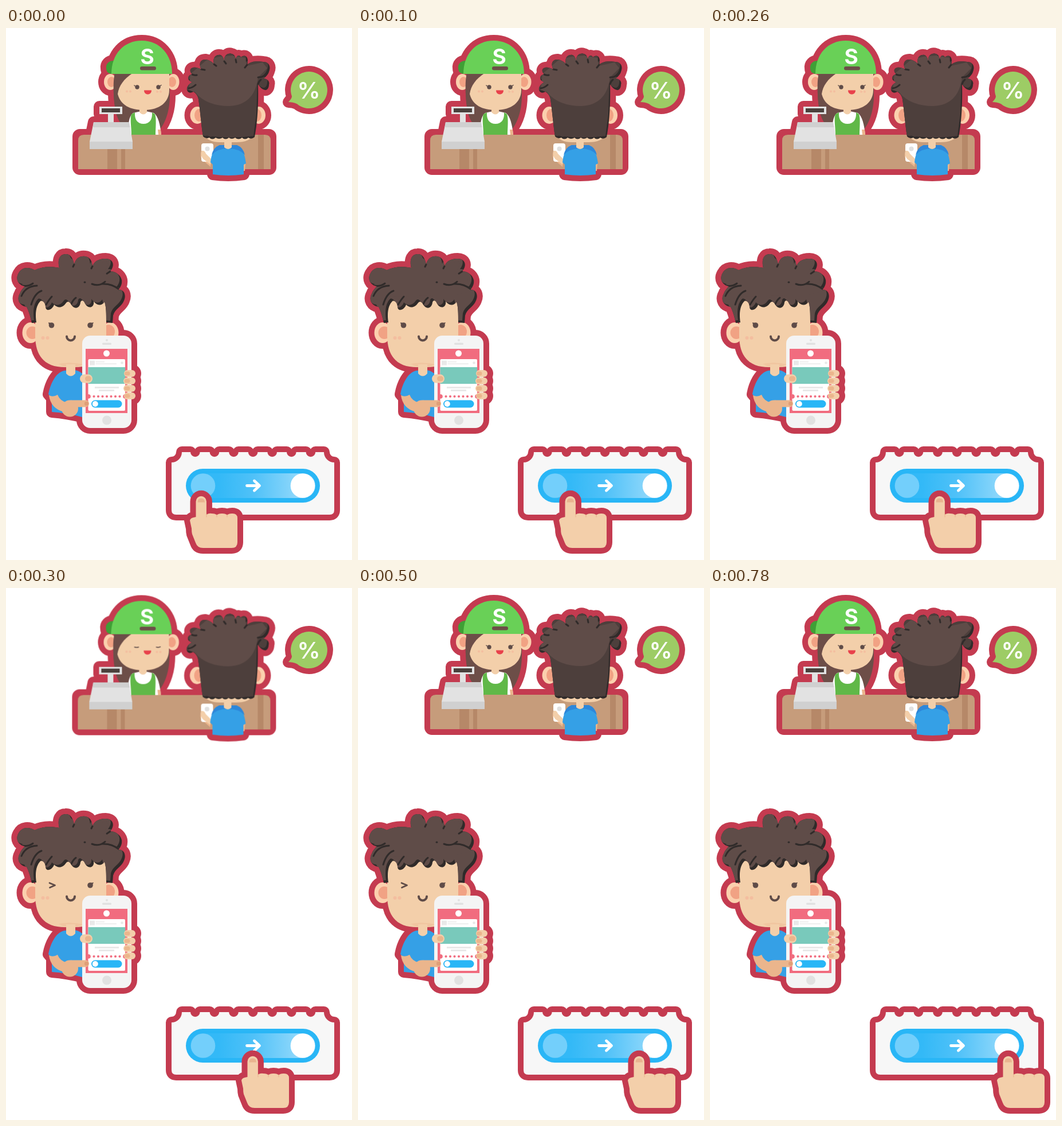
These frames come from a looping animation (604 by 927 pixels, 900 ms). An HTML page:

```html
<!DOCTYPE html>
<html lang="en">
<head>
<meta charset="utf-8">
<title>Slide the coupon</title>
<style>
  html, body { margin: 0; width: 100%; height: 100%; overflow: hidden; background: #fff; }
  svg { display: block; width: 604px; height: 927px; }
  text { font-family: Inter, "Liberation Sans", sans-serif; fill: #fff; text-anchor: middle; }
  .rim { fill: #c43b50; stroke: #c43b50; stroke-width: 20; stroke-linejoin: round; }
  .skin { fill: #f3cfaa; }
  .ear { fill: #fbd0ae; }
  .blush { fill: #f1a284; }
  .tan { fill: #ebb58c; }
  .shirt { fill: #35a0e6; }
  .dark { fill: #302b2a; }
  .hair { fill: #5f4c48; }
  .brown { fill: #6d4e48; }
  .ink { fill: none; stroke: #5f4c48; stroke-linecap: round; stroke-linejoin: round; }
  .curl { fill: none; stroke: #302b2a; stroke-width: 3; stroke-linecap: round; }

  /* One 900 ms loop; every pose is held, then jumps. */
  #hand { animation: drag 900ms infinite; }
  #shop { animation: nudge 900ms step-end infinite; }
  .blinkOpen { animation: hide 900ms step-end infinite; }
  .blinkShut { animation: show 900ms step-end infinite; }
  .winkOpen { animation: hideLong 900ms step-end infinite; }
  .winkShut { animation: showLong 900ms step-end infinite; }
  @keyframes drag {
    0% { transform: translateX(0); animation-timing-function: steps(6, end); }
    66.66%, 100% { transform: translateX(180px); }
  }
  @keyframes nudge { 0%, 55.55% { transform: none; } 33.33% { transform: translate(-.6px, .5px); } }
  @keyframes hide { 0%, 55.55% { opacity: 1; } 33.33% { opacity: 0; } }
  @keyframes show { 0%, 55.55% { opacity: 0; } 33.33% { opacity: 1; } }
  @keyframes hideLong { 0%, 66.66% { opacity: 1; } 33.33% { opacity: 0; } }
  @keyframes showLong { 0%, 66.66% { opacity: 0; } 33.33% { opacity: 1; } }
</style>
</head>
<body>
<svg viewBox="0 0 604 927" xmlns="http://www.w3.org/2000/svg">
  <defs>
    <linearGradient id="glow">
      <stop offset=".22" stop-color="#33b9f7"/>
      <stop offset=".5" stop-color="#4fc1f8"/>
      <stop offset=".85" stop-color="#8dd7fb"/>
    </linearGradient>

    <path id="cap" d="M184 80C184 45 206 22 237 22C269 22 290 47 290 80Z"/>
    <path id="brim" d="M188 57C179 57 174 63 175 70C175 76 178 79 184 80H190Z"/>
    <path id="longHair" d="M190 78C187 100 187 128 192 148C196 162 202 170 209 176H269C279 164 286 142 286 118V78Z"/>
    <path id="till" d="M163 137H203V150H188V164H215L221 198V211H146V198L153 164H178V150H163Z"/>
    <path id="counter" d="M126 246V196Q126 186 136 186H452Q462 186 462 196V246Z"/>

    <path id="backHair" d="M344 189C341 170 339 145 336 124C335 118 331 113 327 111C320 116 313 109 317 102
      C319 98 323 96 325 94C318 92 316 87 320 83C322 81 324 81 325 80C318 74 323 67 332 69C336 70 339 71 341 72
      C335 61 341 54 349 55C355 56 360 59 363 63C360 50 368 46 374 47C378 48 380 53 381 58C380 47 388 43 394 45
      C399 46 400 50 401 55C402 47 408 46 410 51C417 45 425 50 421 64C428 57 441 58 449 59C459 59 463 67 459 76
      C457 82 453 86 449 88C456 88 461 93 459 99C459 104 456 109 452 108C447 107 443 103 440 98
      C441 130 439 165 434 190q-6 5-11 1q-6 5-11 0q-6 5-12 0q-6 4-11 0q-6 5-11 0q-6 4-12 0q-6 5-11 0q-6 3-11-2Z"/>
    <path id="backBody" d="M373 204C363 208 358 222 357 234L361 238V255Q388 259 415 255V238L419 236C417 221 413 208 403 204Z"/>
    <g id="backEars">
      <ellipse cx="334" cy="152" rx="12.5" ry="15"/>
      <ellipse cx="441" cy="152" rx="12" ry="15"/>
    </g>
    <rect id="smallPhone" x="341" y="201" width="21" height="32" rx="4"/>

    <path id="bubble" d="M529 76A32 32 0 1 1 508 132.200C503 130 498 129 493 129C496 126 499 122 499 119A32 32 0 0 1 529 76Z"/>

    <path id="curls" d="M45 514C42 500 39 492 36 486C24 484 18 474 24 463C26 457 30 453 33 450C21 448 16 437 22 427
      C28 416 40 416 50 422C62 416 78 415 93 418C89 402 95 394 104 394C113 393 117 402 119 412C122 400 130 397 138 398
      C147 399 150 406 151 415C155 404 166 402 174 402C185 402 192 411 182 424C191 424 200 430 202 439
      C203 446 200 452 196 456C207 455 210 466 206 475C202 486 190 489 187 501L186 514L175 513
      C175 497 175 487 172 477C167 485 158 484 153 476C155 488 142 491 137 478C135 474 131 474 130 478
      C129 489 119 491 114 482C111 476 107 476 105 479C98 489 90 488 84 482C82 490 70 496 69 486
      C69 479 64 474 60 476C54 482 50 494 53 513Z"/>
    <path id="face" d="M51 460H175V560C168 582 145 591 120 591H102C74 591 51 578 51 536Z"/>
    <g id="frontEars">
      <ellipse cx="43" cy="531" rx="14.500" ry="18"/>
      <ellipse cx="182" cy="531" rx="14.500" ry="18"/>
    </g>
    <path id="torso" d="M102 597C86 600 77 622 74 638L80 645V669Q108 671 133 678V602Q126 596 118 596Z"/>
    <rect id="phone" x="133" y="536" width="86" height="161" rx="14"/>
    <g id="fingers">
      <rect x="206" y="596" width="20" height="12" rx="6"/>
      <rect x="205" y="609" width="21" height="12" rx="6"/>
      <rect x="205" y="622" width="21" height="12" rx="6"/>
      <rect x="206" y="635" width="20" height="12" rx="6"/>
    </g>

    <path id="ticket" d="M289 757A18 18 0 0 0 307 739H322a8.300 8.300 0 0 0 16.600 0h17a8.300 8.300 0 0 0 16.600 0h17
      a8.300 8.300 0 0 0 16.600 0h17a8.300 8.300 0 0 0 16.600 0h17a8.300 8.300 0 0 0 16.600 0h17a8.300 8.300 0 0 0 16.600 0h17
      a8.300 8.300 0 0 0 16.600 0H555A18 18 0 0 0 573 757V840Q573 848 565 848H297Q289 848 289 840Z"/>
    <path id="fist" d="M331.500 825a9.200 9.200 0 0 1 18.400 0V848Q354 845 359 846Q366 846 368 849Q370 846 377 846Q384 846 386 849
      Q388 846 395 846Q404 846 404 854V896Q404 906 394 906H344Q334 906 331 897L325 882Q324 878 324 872L321 858Q322 854 327 853L331.500 852Z"/>

    <clipPath id="backClip"><use href="#backHair"/></clipPath>
    <clipPath id="curlClip"><use href="#curls"/></clipPath>
    <clipPath id="counterClip"><use href="#counter"/></clipPath>
  </defs>

  <g id="shop">
    <g class="rim">
      <use href="#cap"/><use href="#brim"/><use href="#longHair"/>
      <ellipse cx="182" cy="94" rx="11" ry="14"/><ellipse cx="292" cy="94" rx="10.500" ry="14"/>
      <use href="#till"/><rect x="126" y="186" width="336" height="60" rx="3"/>
      <use href="#backHair"/><use href="#backEars"/><use href="#backBody"/>
    </g>

    <!-- cashier -->
    <use href="#longHair" class="brown"/>
    <g class="ear"><ellipse cx="182" cy="94" rx="11" ry="14"/><ellipse cx="292" cy="94" rx="10.500" ry="14"/></g>
    <g class="blush"><ellipse cx="184" cy="94" rx="7" ry="9"/><ellipse cx="290" cy="94" rx="7" ry="9"/></g>
    <path class="brown" d="M190 78C186 95 187 130 194 150L215 140V78Z"/>
    <path fill="#fff" d="M214 186C213 168 214 154 222 148L240 144L258 148C266 154 269 168 271 186Z"/>
    <path fill="#60b848" d="M219 186C219 172 216 158 219 150L225 147C224 160 230 167 240 167C250 167 256 160 255 147L260 150C263 158 261 174 261 186Z"/>
    <path class="tan" d="M265 177H270L271 186H266Z"/>
    <path class="skin" d="M233 138H246V147Q240 154 233 147Z"/>
    <path class="skin" d="M222 78C205 89 197 101 195 115C200 134 216 143 241 143C268 143 285 129 285 108V78Z"/>
    <use href="#brim" fill="#3f9f36"/>
    <use href="#cap" fill="#69d057"/>
    <text x="246.500" y="62.500" font-size="37" font-weight="700">S</text>
    <rect class="brown" x="234" y="67" width="28" height="6.500" rx="3.200"/>
    <g fill="#f5b79b" opacity=".7"><circle cx="211" cy="110.500" r="2"/><circle cx="217" cy="110.500" r="2"/><circle cx="264" cy="111" r="2"/><circle cx="270" cy="111" r="2"/></g>
    <g class="blinkOpen">
      <g class="hair"><circle cx="229" cy="103" r="3.700"/><circle cx="266" cy="103" r="3.700"/></g>
      <path class="ink" stroke-width="1.500" d="M225 101L224 100M269 101L271 99.500"/>
    </g>
    <path class="ink blinkShut" stroke-width="1.600" d="M225 102.500Q229 103.500 232 102.500M263 102.500Q266 103.500 270 102"/>
    <path fill="#e8414b" d="M241 108.500H254C254 113 251 115.500 247.500 115.500C244 115.500 241 113 241 108.500Z"/>

    <!-- counter and till -->
    <use href="#counter" fill="#c69c7b"/>
    <path clip-path="url(#counterClip)" fill="#b68868" d="M177 186H194V246H177ZM201 186H208V246H201ZM440 186H450V246H440Z"/>
    <use href="#till" fill="#e2e2e2"/>
    <path fill="#d0d0d0" d="M153 164H215L216.500 173H151.500ZM146 198H221V211H146Z"/>
    <rect x="167" y="140" width="32" height="7" fill="#4a403c"/>

    <!-- customer -->
    <use href="#backEars" class="ear"/>
    <g class="blush"><ellipse cx="337" cy="152" rx="8" ry="11"/><ellipse cx="438" cy="152" rx="8" ry="11"/></g>
    <path class="skin" d="M346 186H432Q426 199 402 199H374Q352 199 346 186Z"/>
    <path class="tan" d="M359 225L350 220L341 216Q338 223 342 229L357 242Z"/>
    <path class="tan" d="M414 236H418L417 249H414Z"/>
    <use href="#smallPhone" fill="#fff"/>
    <circle cx="351.500" cy="210.500" r="4" fill="#e0e0e0"/>
    <path class="skin" d="M341 214Q347 213 349 219L358 228L357 238L344 228Q339 222 341 214Z"/>
    <use href="#backBody" class="shirt"/>
    <path fill="#2d87da" d="M373 204Q362 208 359 221Q369 210 388 210Q407 210 417 221Q414 208 403 204Z"/>
    <path class="skin" d="M381 194H394V208Q388 214 381 208Z"/>
    <use href="#backHair" class="dark"/>
    <g clip-path="url(#backClip)">
      <path fill="#4d3f3c" d="M337 90H439L437 150L432 188Q388 194 347 187L341 130Z"/>
      <use href="#backHair" fill="#4d3f3c" transform="translate(-3 -4)"/>
      <path class="hair" d="M322 80L336 68L350 56L372 50L394 48L418 52L420 66L448 60L456 70L440 86Q434 134 390 136Q350 136 330 112L319 108Z"/>
      <path class="curl" d="M319 105Q326 104 331 99M325 81Q330 83 333 82M341 72L347 73M363 63L367 66M381 58L384 62M401 55L402 60M421 64L417 69M459 76Q452 86 440 86M440 98Q441 93 445 90"/>
    </g>
  </g>

  <!-- discount bubble -->
  <use href="#bubble" class="rim"/>
  <use href="#bubble" fill="#9dcc65"/>
  <text x="528.500" y="123" font-size="40" font-weight="600">%</text>

  <!-- boy with phone -->
  <g class="rim">
    <use href="#curls"/><use href="#face"/><use href="#frontEars"/><use href="#torso"/><use href="#phone"/><use href="#fingers"/>
  </g>
  <use href="#frontEars" class="ear"/>
  <g class="blush"><ellipse cx="46" cy="531" rx="10.500" ry="11"/><ellipse cx="179" cy="529" rx="11" ry="12"/></g>
  <use href="#torso" class="shirt"/>
  <use href="#face" class="skin"/>
  <path fill="#f0c5a0" d="M92 585Q113 581 135 586Q125 591 113 591Q101 591 92 585Z"/>
  <path class="skin" d="M105 586H121V602Q113 611 105 602Z"/>
  <g fill="#f5b79b" opacity=".7"><circle cx="64.500" cy="540" r="3"/><circle cx="72.500" cy="540" r="3"/></g>
  <path class="ink" stroke-width="4" d="M106 537.500a7 7 0 0 0 14 0"/>
  <g class="hair">
    <g class="winkOpen"><circle cx="79.500" cy="518" r="4.800"/><path d="M75 517L74 513L79 514Z"/></g>
    <circle cx="147" cy="518" r="4.800"/><path d="M151 517L153 513L147 514Z"/>
  </g>
  <path class="ink winkShut" stroke-width="2.800" d="M76 514L85.500 518L76.500 522"/>
  <use href="#curls" class="dark"/>
  <g clip-path="url(#curlClip)">
    <use href="#curls" class="hair" transform="translate(-4 -4)"/>
    <path class="hair" d="M24 428L36 420L94 417L98 397L112 400L122 408L136 400L150 414L180 405L170 430L192 434L190 460L170 466L150 466L60 468L32 474L40 446Z"/>
    <path class="curl" d="M28 449Q39 451 47 445M27 467Q34 450 54 449M44 482Q50 462 62 458M137 443h1M150 446Q163 451 173 442M168 446Q184 445 197 455M70 482Q76 472 80 468M113 484Q116 474 122 470M119 412L117 416M151 415L149 419M182 424L176 428"/>
  </g>

  <path class="tan" d="M75 640Q82 644 90 639Q94 650 107 653L101 669Q78 663 75 640Z"/>
  <use href="#phone" fill="#f4f4f4"/>
  <g fill="#e1e1e1">
    <circle cx="176" cy="544" r="2"/><rect x="168" y="548.500" width="16" height="3.500" rx="1.700"/><circle cx="176" cy="683.500" r="8"/>
  </g>
  <path fill="#f16c7f" d="M139 559H212V671H139Z"/>
  <circle cx="175.500" cy="567" r="5.500" fill="#fff"/>
  <rect x="143.500" y="577" width="64.500" height="90" rx="2" fill="#fff"/>
  <path fill="#79c9bb" d="M143.500 591H208V620H143.500Z"/>
  <path fill="#e9e9e9" d="M146 579.500H155V587.500H146ZM156.500 581H172V582.500H156.500ZM156.500 584.500H193V586H156.500ZM155 625H197V628H155ZM162 630H189V633H162Z"/>
  <circle cx="202.500" cy="583.500" r="2.300" fill="#e9e9e9"/>
  <path d="M153.500 642H200" stroke="#f16c7f" stroke-width="4.200" stroke-linecap="round" stroke-dasharray="0 7.500"/>
  <g fill="#f16c7f"><circle cx="144" cy="642" r="3.800"/><circle cx="208" cy="642" r="3.800"/></g>
  <rect x="149" y="648.500" width="53.500" height="13" rx="6.500" fill="#29b6f6"/>
  <circle cx="155.800" cy="655" r="5" fill="#fff"/>
  <use href="#fingers" class="skin"/>
  <path d="M210.500 602H213M210 615H213M210 628H213M210.500 641H213" stroke="#ebb58c" stroke-width="7" stroke-linecap="round"/>
  <rect class="skin" x="129" y="603.500" width="22" height="15" rx="7.500"/>
  <rect class="tan" x="138" y="606.500" width="11" height="9" rx="4.500"/>
  <circle class="tan" cx="111.500" cy="663" r="14.500"/>
  <rect class="tan" x="108" y="648.500" width="37" height="12" rx="6"/>
  <rect x="137" y="651" width="7" height="7" rx="3" fill="#e09e78"/>

  <!-- ticket slider -->
  <use href="#ticket" class="rim"/>
  <use href="#ticket" fill="#f7f7f7"/>
  <rect x="314" y="768" width="234" height="59" rx="29.500" fill="#29b6f6"/>
  <rect x="322" y="776" width="218" height="43" rx="21.500" fill="url(#glow)"/>
  <circle cx="344" cy="797.500" r="21.300" fill="#73cffb"/>
  <circle cx="518" cy="797.500" r="21.300" fill="#fff"/>
  <path d="M420.500 797.500H442M433.500 789L442.500 797.500L433.500 806" fill="none" stroke="#fff" stroke-width="4.800" stroke-linecap="round" stroke-linejoin="round"/>

  <g id="hand">
    <use href="#fist" class="rim"/>
    <use href="#fist" class="skin"/>
    <path fill="#e9b48f" d="M334.500 826.500Q334.500 819.500 340.700 819.500Q347 819.500 347 826.500Z"/>
    <path d="M350 847V852M368 848V852M386 848V852" stroke="#e9b992" stroke-width="1.200" stroke-linecap="round"/>
  </g>
</svg>
</body>
</html>
```
